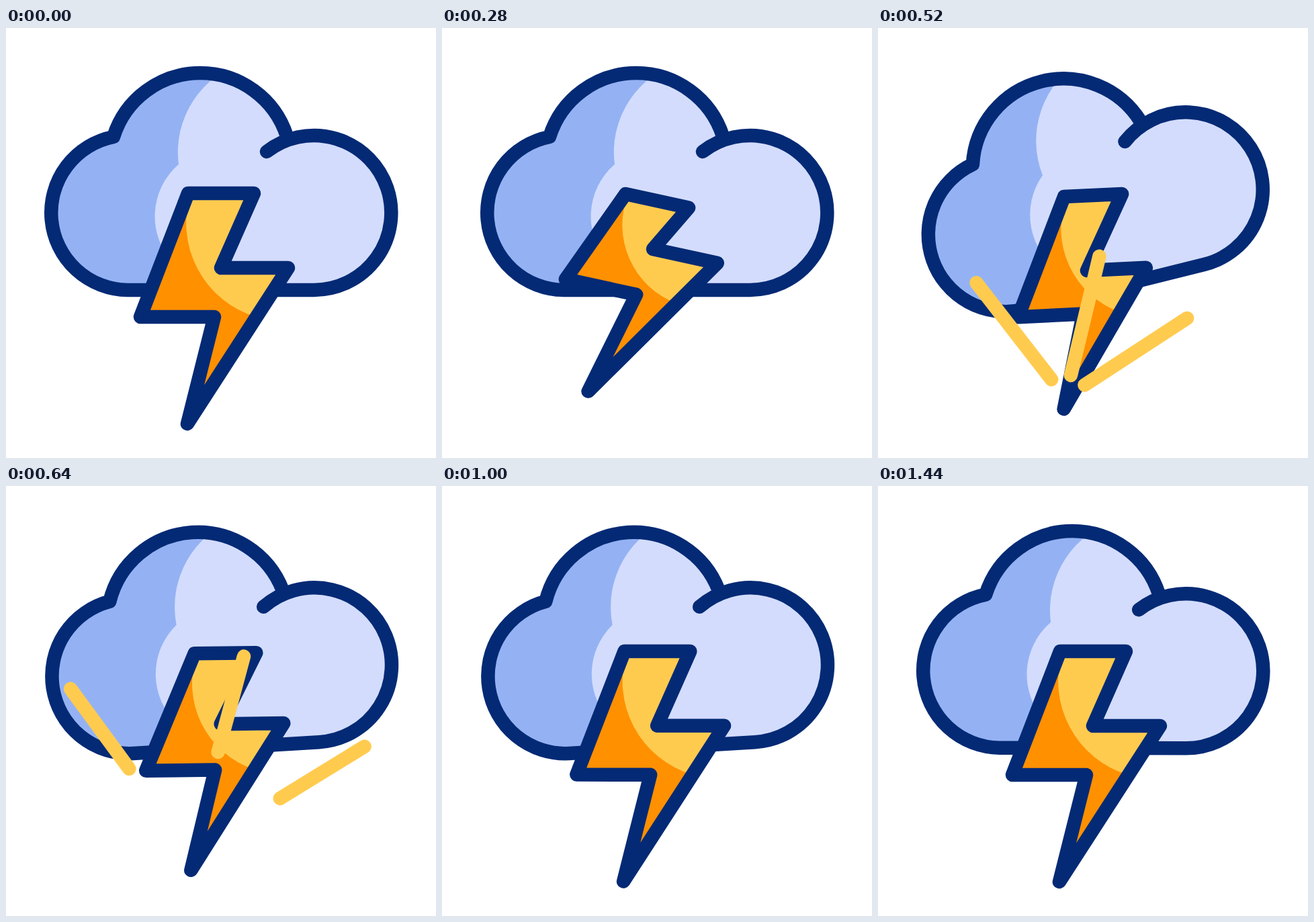
Recreate the animation shown at these times as an HTML page. Size 640 by 640 pixels, loop 2000 ms.

```html
<!DOCTYPE html>
<html lang="en">
<head>
<meta charset="utf-8">
<title>Thunderstorm</title>
<style>
  html, body { margin: 0; width: 100%; height: 100%; overflow: hidden; background: #fff; }
  svg { display: block; width: 100vw; height: 100vh; }
  .outline { fill: none; stroke: #042a75; stroke-width: 20.5; stroke-linecap: round; stroke-linejoin: round; }
  #sparks { stroke: #ffcb4f; stroke-width: 20.5; stroke-linecap: round; }
</style>
</head>
<body>
<svg viewBox="0 0 640 640">
  <defs>
    <path id="body" d="M181 390A115.1 115.1 0 0 1 160 162A135.3 135.3 0 0 1 418 161L420 166.5A115 115 0 1 1 458 390Z"/>
    <clipPath id="inCloud"><use href="#body"/></clipPath>
  </defs>
  <g id="cloud">
    <use href="#body" fill="#94b2f3"/>
    <path clip-path="url(#inCloud)" fill="#d3dcfd"
      d="M358 50A140 140 0 0 0 257 203A102 102 0 0 0 250 351V420H600V50Z"/>
    <path class="outline" d="M388 184A115 115 0 1 1 458 390H181A115.1 115.1 0 0 1 160 162A135.3 135.3 0 0 1 418 161"/>
  </g>
  <polygon class="bolt" fill="#ff9000"/>
  <path id="shine" fill="#ffcb4f"/>
  <polygon class="bolt outline"/>
  <path id="sparks"/>
</svg>
<script>
const LOOP = 2000, STEP = 40, BEAT = 240;
const cloud = document.getElementById("cloud");
const shine = document.getElementById("shine");
const sparks = document.getElementById("sparks");
const bolts = document.querySelectorAll(".bolt");

const mix = (a, b, p) => a + (b - a) * p;
const span = (t, a, b) => Math.min(1, Math.max(0, (t - a) / (b - a)));
const rad = deg => deg * Math.PI / 180;

const smooth = p => p * p * (3 - 2 * p);
const out = p => 1 - (1 - p) ** 3;
const settle = p => out(p * 0.4) / out(0.4);

// Bolt corners relative to its inner notch; the first two form the top edge.
const CORNERS = [[-49, -111], [49, -111], [0, 0], [100, 0], [-50, 232], [-10, 73], [-120, 73]];

// Notch x, y, turn, size, then the offset of the top edge.
const REST = [320, 357, 0, 1, 0, 0];
const BOLT_KEYS = [
  [0, REST],
  [40, REST],
  [280, [314, 329, 12.3, 0.98, -17, 34.5], smooth],
  [520, [311, 361, -2.7, 0.88, 13.7, -14.4], smooth],
  [760, [325, 350, 0.6, 0.97, 4.4, 6.2], settle],
  [1120, REST, out],
  [LOOP, REST]
];

function boltPose(t) {
  const i = BOLT_KEYS.findIndex(key => key[0] > t);
  const [t0, from] = BOLT_KEYS[i - 1], [t1, to, ease = smooth] = BOLT_KEYS[i];
  const p = ease(span(t, t0, t1));
  return from.map((v, n) => mix(v, to[n], p));
}

function drawBolt(t) {
  const [x, y, turn, size, topX, topY] = boltPose(t);
  const c = size * Math.cos(rad(turn)), s = size * Math.sin(rad(turn));
  const pts = CORNERS.map(([u, v], i) => [
    x + u * c - v * s + (i < 2 ? topX : 0),
    y + u * s + v * c + (i < 2 ? topY : 0)
  ]);
  bolts.forEach(el => el.setAttribute("points", pts.join(" ")));

  // The shine is bounded by an arc from the top left to the long right edge.
  const [left, right, notch, elbow, tip] = pts;
  const start = [left[0] + 4, left[1]];
  const end = elbow.map((v, n) => mix(v, tip[n], 0.315));
  const r = 0.7 * Math.hypot(end[0] - start[0], end[1] - start[1]);
  shine.setAttribute("d", `M${start}A${r} ${r} 0 0 0 ${end}L${elbow}L${notch}L${right}Z`);
}

// Swings start at 280 ms; each is half the last, the other way.
function sway(t) {
  const peak = n => n < 1 || n > 4 ? 0 : -14 * (-0.5) ** (n - 1);
  const beat = (t - 280) / BEAT, n = Math.floor(beat);
  return mix(peak(n), peak(n + 1), smooth(beat - n));
}

function drawSparks(t) {
  const head = 23 + 304 * out(span(t, 400, 820));
  const tail = 23 + 304 * smooth(span(t, 480, 830));
  const drift = settle(span(t, 520, 760));
  const at = (r, a) => [279 - 6 * drift + r * Math.cos(a), 550 - 6 * drift + r * Math.sin(a)];
  const ray = deg => {
    const a = rad(deg + 2.5 * drift);
    return `M${at(tail, a)}L${at(head, a)}`;
  };
  sparks.setAttribute("d", head - tail > 0.5 ? [-127.8, -76.5, -33.1].map(ray).join("") : "");
}

function draw(t) {
  cloud.setAttribute("transform", `rotate(${sway(t)} 317 260)`);
  drawBolt(t);
  drawSparks(t);
}

const began = performance.now();
function tick() {
  const t = (performance.now() - began) % LOOP;
  draw(Math.floor(t / STEP) * STEP);
  requestAnimationFrame(tick);
}
tick();
</script>
</body>
</html>
```
